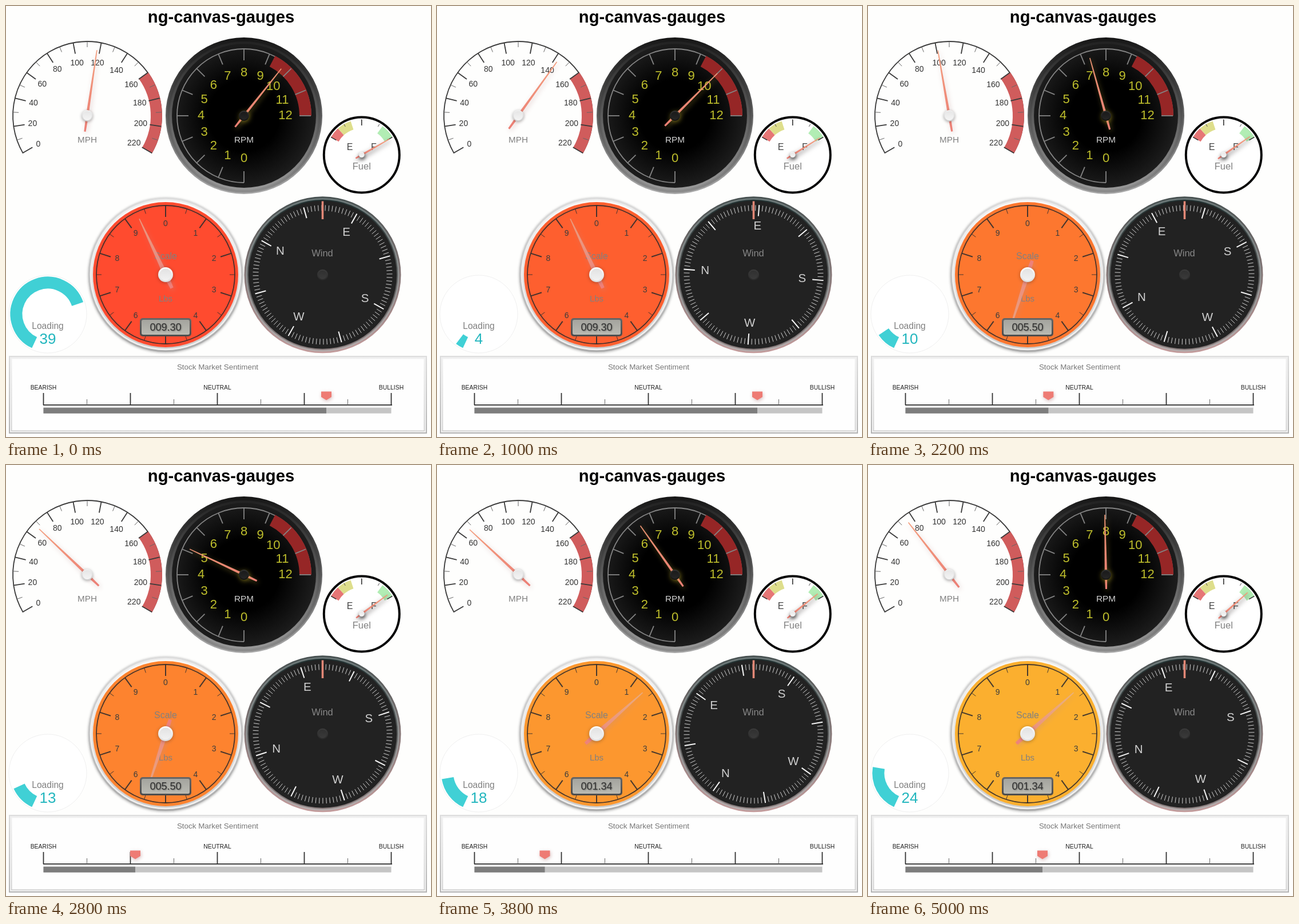
These frames come from a looping animation (743x754 px, 5200 ms). An HTML page with a canvas:

```html
<!DOCTYPE html>
<html lang="en">
<head>
<meta charset="utf-8">
<title>ng-canvas-gauges</title>
<style>
  html, body { margin: 0; width: 100%; height: 100%; overflow: hidden; background: #fefefd; }
  canvas { display: block; }
</style>
</head>
<body>
<canvas id="stage" width="743" height="754"></canvas>
<script>
const ctx = document.getElementById('stage').getContext('2d');
const LOOP = 5200, STEP = 200;
const CORAL = '#ec7f76', SALMON = 'rgba(243,152,118,.95)';

// Keyframes as [time, value]; angles are degrees clockwise from the top.
const tracks = {
  mph: [[0, 8.4], [1000, 35.6], [1800, 14.5], [2800, -46.4], [3800, -47.1], [4400, -37.7], [5000, -38]],
  rpm: [[0, 38.4], [1000, 45], [1800, 17.2], [2800, -64.7], [3800, -35.2], [4400, 0], [5000, -1.1]],
  fuel: [[0, 60.3], [5000, 48.4]],
  weight: [[1400, 9.3], [1800, 6.39], [2000, 5.5], [3200, 5.5], [3600, 1.34]],
  east: [[0, 29.3], [1000, 4.6], [1800, -34.5], [2800, -18.2], [3800, -54.7], [4400, -20.3], [5000, -19.2]],
  market: [[1400, 560], [1800, 494], [2400, 226], [3200, 226], [3600, 188.5], [4600, 188.5], [5000, 305]]
};

function valueAt(keys, t) {
  if (t <= keys[0][0]) return keys[0][1];
  for (let i = 1; i < keys.length; i++) {
    const [t0, v0] = keys[i - 1], [t1, v1] = keys[i];
    if (t <= t1) return v0 + (v1 - v0) * (t - t0) / (t1 - t0);
  }
  return keys[keys.length - 1][1];
}

const rad = deg => (deg - 90) * Math.PI / 180;
const polar = (x, y, r, deg) => [x + r * Math.cos(rad(deg)), y + r * Math.sin(rad(deg))];

function text(str, x, y, size, color, weight = '') {
  ctx.font = `${weight} ${size}px "Liberation Sans", Arial, sans-serif`;
  ctx.textAlign = 'center';
  ctx.fillStyle = color;
  ctx.fillText(str, x, y - 0.5 + size * 0.36);
}

function vertical(y0, y1, top, bottom) {
  const g = ctx.createLinearGradient(0, y0, 0, y1);
  g.addColorStop(0, top);
  g.addColorStop(1, bottom);
  return g;
}

function disc(x, y, r, top, bottom = top) {
  ctx.fillStyle = vertical(y - r, y + r, top, bottom);
  ctx.beginPath();
  ctx.arc(x, y, r, 0, 7);
  ctx.fill();
}

function line(x0, y0, x1, y1, width, color) {
  ctx.strokeStyle = color;
  ctx.lineWidth = width;
  ctx.beginPath();
  ctx.moveTo(x0, y0);
  ctx.lineTo(x1, y1);
  ctx.stroke();
}

function arc(x, y, r, from, to, width, color) {
  ctx.strokeStyle = color;
  ctx.lineWidth = width;
  ctx.beginPath();
  ctx.arc(x, y, r, rad(from), rad(to));
  ctx.stroke();
}

const sector = (x, y, inner, outer, from, to, color) =>
  arc(x, y, (inner + outer) / 2, from, to, outer - inner, color);

function ticks(x, y, from, step, count, inner, outer, width, color) {
  for (let i = 0; i < count; i++) {
    const a = from + i * step;
    line(...polar(x, y, inner, a), ...polar(x, y, outer, a), width, color);
  }
}

function withShadow(color, blur, dx, dy, draw) {
  ctx.save();
  ctx.shadowColor = color;
  ctx.shadowBlur = blur;
  ctx.shadowOffsetX = dx;
  ctx.shadowOffsetY = dy;
  draw();
  ctx.restore();
}

function needle(x, y, angle, tail, tip, half, shadow, from = CORAL, to = SALMON) {
  withShadow(shadow, 8, 2, 3, () => {
    ctx.translate(x, y);
    ctx.rotate(angle * Math.PI / 180);
    ctx.fillStyle = vertical(tail, -tip, from, to);
    ctx.beginPath();
    ctx.moveTo(-half * 0.7, tail);
    ctx.lineTo(half * 0.7, tail);
    ctx.lineTo(half, 0);
    ctx.lineTo(0.8, -tip);
    ctx.lineTo(-0.8, -tip);
    ctx.lineTo(-half, 0);
    ctx.fill();
  });
}

function hub(x, y, r, outer, inner) {
  withShadow('rgba(0,0,0,.3)', r * 0.5, 0, 1, () => disc(x, y, r, ...outer));
  disc(x, y, r * 0.8, ...inner);
}

function speed(angle) {
  const x = 142, y = 192, step = 240 / 11, ink = '#3a3a3a';
  arc(x, y, 130, -120.3, 120.3, 1.8, ink);
  sector(x, y, 111, 131, -120 + 8 * step, 120, '#d05c5c');
  ticks(x, y, -120 + step / 2, step, 11, 120, 130, 1, '#666');
  ticks(x, y, -120, step, 12, 110.5, 130.5, 1.8, ink);
  for (let i = 0; i < 12; i++) {
    const label = String(i * 20);
    text(label, ...polar(x, y, 101 - 2.2 * label.length, -120 + i * step), 14, '#333');
  }
  text('MPH', x, 234, 15.3, '#808080');
  needle(x, y, angle, 28, 116, 2.3, 'rgba(188,143,143,.45)');
  hub(x, y, 10, ['#f2f2f2', '#ccc'], ['#e6e6e6', '#f5f5f5']);
}

function revs(angle) {
  const x = 416, y = 192, ink = '#848484';
  disc(x, y, 137, '#161616', '#aaa');
  disc(x, y, 134.5, '#181818', '#8c8c8c');
  disc(x, y, 130, '#222', '#989898');
  const plate = ctx.createRadialGradient(x, y, 62, x, y, 126);
  plate.addColorStop(0, '#000');
  plate.addColorStop(1, '#1d1d1d');
  ctx.fillStyle = plate;
  ctx.beginPath();
  ctx.arc(x, y, 126, 0, 7);
  ctx.fill();
  arc(x, y, 117, 180, 450, 1.8, ink);
  sector(x, y, 97, 118, 27.5, 90, '#962626');
  ticks(x, y, 180, 22.5, 13, 97, 117, 1.8, ink);
  for (let i = 0; i < 13; i++) {
    text(i, ...polar(x, y - 1, i > 9 ? 72.5 : 75, 180 + i * 22.5), 22, '#bebe2c');
  }
  text('RPM', x, 234, 15.3, '#d4d4d4');
  needle(x, y, angle, 25, 105, 2.2, 'rgba(200,180,60,.45)');
  withShadow('rgba(200,180,40,.5)', 8, 1, 2, () => disc(x, y, 9, '#333', '#111'));
  disc(x, y, 7, '#1a1a1a', '#262626');
}

function fuel(angle) {
  const x = 621.8, y = 260.4;
  disc(x, y, 66, '#fff');
  arc(x, y, 66, 0, 360, 4, '#050505');
  sector(x, y, 46.5, 62, -60, -42, '#e67676');
  sector(x, y, 46.5, 62, -42, -18, '#dede8c');
  sector(x, y, 46.5, 62, 36, 60, '#b2edb4');
  ticks(x, y, -30, 60, 2, 57, 62, 1, '#555');
  ticks(x, y, -60, 60, 3, 51.5, 62, 1.6, '#333');
  text('E', 601, 247, 16, '#444');
  text('F', 643, 247, 16, '#444');
  text('Fuel', x, 281, 16.5, '#808080');
  needle(x, y, angle, 12, 56, 1.7, 'rgba(40,30,30,.75)');
  withShadow('rgba(0,0,0,.7)', 6, 1, 3, () => disc(x, y, 5, '#fff', '#ccc'));
  disc(x, y, 4, '#e8e8e8', '#f8f8f8');
}

function scale(weight, reading, n) {
  const x = 279, y = 470, ink = 'rgba(50,45,45,.9)';
  withShadow('rgba(0,0,0,.35)', 4, 0, 1, () => disc(x, y, 135, '#ddd', '#aaa'));
  disc(x, y, 132.3, '#eee', '#f0f0f0');
  disc(x, y, 129.6, '#fafafa', '#ccc');
  disc(x, y, 127, `rgb(${255 - n * 0.16},${75 + n * 4},47)`);
  arc(x, y, 121, 0, 360, 1.8, ink);
  ticks(x, y, 18, 36, 10, 112, 121, 1, ink);
  ticks(x, y, 0, 36, 10, 101, 121, 2, ink);
  for (let i = 0; i < 10; i++) text(i, ...polar(x, y - 0.6, 89, i * 36), 14, '#3c3c3c');
  text('Scale', x, 438, 16, '#808080');
  text('Lbs', x, 512, 15, '#808080');
  needle(x, y, weight * 36, 26, 108, 4, 'rgba(188,143,143,.45)',
    'rgba(238,128,124,.95)', 'rgba(228,180,156,.7)');
  hub(x, y, 13, ['#fff', '#ddd'], ['#e2e2e2', '#f2f2f2']);

  ctx.fillStyle = vertical(546, 578, '#666', '#4c4c4c');
  ctx.beginPath();
  ctx.roundRect(234, 546, 90, 32, 5);
  ctx.fill();
  ctx.fillStyle = vertical(549, 575, '#a4a49e', '#babab2');
  ctx.beginPath();
  ctx.roundRect(237, 549, 84, 26, 3);
  ctx.fill();
  withShadow('rgba(0,0,0,.4)', 2, 1, 1, () =>
    text(reading.toFixed(2).padStart(6, '0'), x, 562, 18, '#333'));
}

function compass(east) {
  const x = 553.5, y = 470.3;
  disc(x, y, 137, '#465050', '#c49c9c');
  disc(x, y, 134.3, '#6a7676', '#b4acac');
  disc(x, y, 131.6, '#203030', '#8c8080');
  disc(x, y, 129.5, '#222');
  ticks(x, y, east, 3, 120, 112, 122, 1, '#d0d0d0');
  ticks(x, y, east, 45, 8, 103, 122.5, 2, '#f5f5f5');
  ['E', 'S', 'W', 'N'].forEach((name, i) =>
    text(name, ...polar(x, y - 1, 85, east + i * 90), 20.5, '#d0d0d0'));
  text('Wind', 553, 433, 16.5, '#888');
  line(x, 341.5, x, 373, 3.6, '#e38877');
  disc(x, y, 9.5, '#3c3c3c', '#2a2a2a');
  disc(x, y, 7.5, '#303030', '#3a3a3a');
}

function loading(n) {
  const x = 73, y = 539;
  const count = n ? n - 1 : 39, sweep = n ? count : 73;
  disc(x, y, 68, '#fff');
  arc(x, y, 68, 0, 360, 1, '#f0f0f0');
  if (sweep) sector(x, y, 44.5, 65.5, 205, 205 + sweep * 3.1, '#40d0d5');
  text('Loading', x, 560, 15.6, '#808080');
  text(count, x, 582.5, 26, '#22b6be');
}

function market(pos) {
  const frame = (inset, top, bottom) => {
    ctx.fillStyle = vertical(612, 748, top, bottom);
    ctx.fillRect(5 + inset, 612 + inset, 731 - 2 * inset, 136 - 2 * inset);
  };
  frame(0, '#ddd', '#b4b4b4');
  frame(2, '#eee', '#f0f0f0');
  frame(4, '#f2f2f2', '#ccc');
  frame(5.5, '#fefefe', '#fefefe');
  text('Stock Market Sentiment', 370, 632, 13.4, '#777');
  text('BEARISH', 65.5, 668, 10.4, '#222');
  text('NEUTRAL', 369.5, 668, 10.4, '#222');
  text('BULLISH', 673.5, 668, 10.4, '#222');
  line(65, 698, 675, 698, 1.8, '#444');
  for (let i = 0; i < 9; i++) {
    const x = 65.5 + i * 76, minor = i % 2;
    line(x, minor ? 688 : 677, x, 698, minor ? 1 : 1.8, minor ? '#666' : '#333');
  }
  ctx.fillStyle = '#c5c5c5';
  ctx.fillRect(65.5, 702.7, 608, 10);
  ctx.fillStyle = '#7d7d7d';
  ctx.fillRect(65.5, 702.7, pos - 65.5, 10);
  withShadow('rgba(188,143,143,.6)', 6, 1, 2, () => {
    ctx.fillStyle = '#ee7b74';
    ctx.beginPath();
    ctx.moveTo(pos - 9, 674.5);
    ctx.lineTo(pos + 9, 674.5);
    ctx.lineTo(pos + 9, 684);
    ctx.lineTo(pos, 689.5);
    ctx.lineTo(pos - 9, 684);
    ctx.fill();
  });
}

function draw(now) {
  const n = Math.floor((now % LOOP) / STEP), t = n * STEP;
  const at = name => valueAt(tracks[name], t);
  ctx.fillStyle = '#fefefd';
  ctx.fillRect(0, 0, 743, 754);
  text('ng-canvas-gauges', 376, 18.6, 29.2, '#000', 'bold');
  speed(at('mph'));
  revs(at('rpm'));
  fuel(at('fuel'));
  // The readout jumps to the new weight while the needle is still moving.
  scale(at('weight'), t <= 1400 ? 9.3 : t <= 3200 ? 5.5 : 1.34, n);
  compass(at('east'));
  loading(n);
  market(at('market'));
}

const begin = performance.now();
function tick() {
  draw(performance.now() - begin);
  requestAnimationFrame(tick);
}
tick();
</script>
</body>
</html>
```
